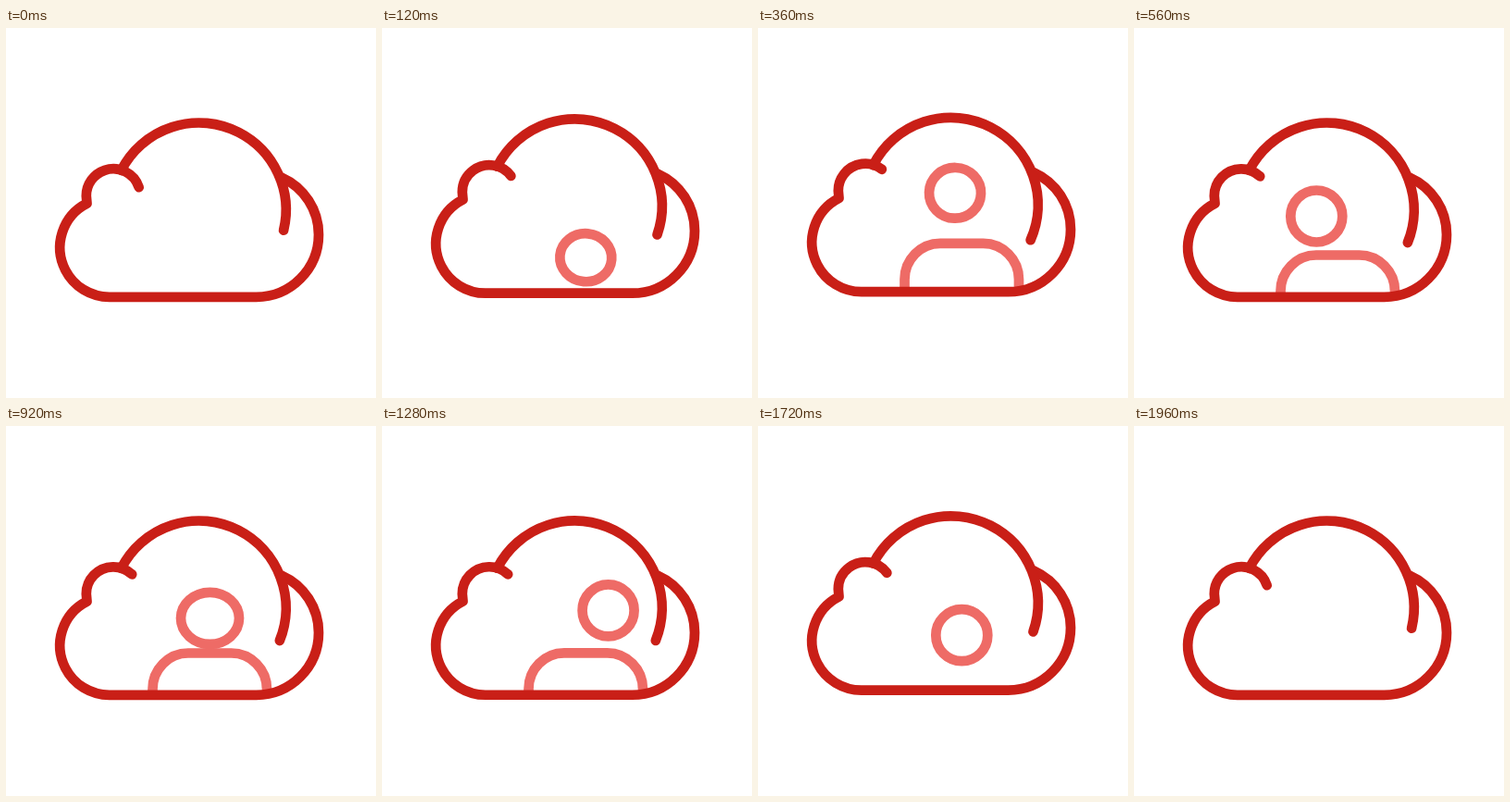
Write an HTML page with a canvas that moves like this. It is 400x400 px and loops after 2 s.

```html
<!DOCTYPE html>
<html lang="en">
<head>
<meta charset="utf-8">
<title>Cloud user</title>
<style>
  html, body { margin: 0; width: 100%; height: 100%; overflow: hidden; background: #fff; }
  canvas { display: block; width: 100vw; height: 100vh; }
</style>
</head>
<body>
<canvas id="stage"></canvas>
<script>
const LOOP = 2000, STEP = 40, SIZE = 400, BASE = 290.8;
const RED = '#c91f17', PINK = '#ee6b66';
const canvas = document.getElementById('stage');
const ctx = canvas.getContext('2d');
const rad = deg => deg * Math.PI / 180;
const mix = (a, b, p) => a + (b - a) * p;

// Smooth progress from 0 to 1 between two times
function ramp(t, from, to) {
  const p = Math.min(1, Math.max(0, (t - from) / (to - from)));
  return p * p * (3 - 2 * p);
}

function pose(t) {
  const rise = ramp(t, 0, 240), settle = ramp(t, 240, 560);
  const roll = ramp(t, 755, 1090);
  const leave = ramp(t, 1260, 1630), sink = ramp(t, 1630, 1850);
  const shown = rise - sink;    // 0 below the base, 1 above it
  const seat = settle - leave;  // 1 while the head rests on the shoulders
  const press = Math.sin(Math.PI * roll);
  const body = mix(390, 227, shown) + 18.5 * seat;
  return {
    body,
    lift: -8.2 * (shown - seat),
    slide: 18.5 * (rise - ramp(t, 1480, 1960)) - 4.5 * seat,
    x: 220.3 + seat * mix(-23, 24.5, roll),
    y: body - 60.3 + seat * mix(18.3, 14.5, roll) + 6.2 * press,
    wide: 3.5 * press,
    flat: rise * (1 - ramp(t, 240, 400))
  };
}

function stroke(color, draw) {
  ctx.strokeStyle = color;
  ctx.beginPath();
  draw();
  ctx.stroke();
}

function person(s) {
  const floor = BASE + s.lift, low = s.body + 39;
  const foot = Math.max(floor, low) + 8;
  ctx.save();
  ctx.beginPath();
  ctx.rect(0, 0, SIZE, floor);
  ctx.clip();
  stroke(PINK, () => {
    ctx.moveTo(158.5, foot);
    ctx.ellipse(197, low, 38.5, 39, 0, Math.PI, Math.PI * 1.5);
    ctx.ellipse(243.5, low, 38.5, 39, 0, -Math.PI / 2, 0);
    ctx.lineTo(282, foot);
  });
  stroke(PINK, () => ctx.ellipse(s.x, s.y, 28 + s.wide, 28 - 4 * s.flat,
    rad(10) * s.flat, 0, Math.PI * 2));
  ctx.restore();
}

function cloud(s) {
  ctx.save();
  ctx.translate(0, s.lift);
  // Small bump, left lobe, base and right lobe
  stroke(RED, () => {
    ctx.arc(116, 181.5, 29.2, rad(-18.7) - s.slide / 29.2, -Math.PI, true);
    ctx.arc(111.8, BASE - 53.5, 53.5, rad(243), rad(90), true);
    ctx.arc(270.5, BASE - 67.5, 67.5, rad(90), rad(-66), true);
  });
  // Main dome
  stroke(RED, () => ctx.arc(208.5, 196.7, 94.2, rad(207.1), rad(373.5) + s.slide / 94.2));
  ctx.restore();
}

function fit() {
  const dpr = window.devicePixelRatio || 1;
  canvas.width = Math.round(innerWidth * dpr);
  canvas.height = Math.round(innerHeight * dpr);
}

const start = performance.now();

function frame() {
  const elapsed = Math.max(0, performance.now() - start) % LOOP;
  const s = pose(Math.floor(elapsed / STEP) * STEP);
  ctx.setTransform(canvas.width / SIZE, 0, 0, canvas.height / SIZE, 0, 0);
  ctx.fillStyle = '#fff';
  ctx.fillRect(0, 0, SIZE, SIZE);
  ctx.lineWidth = 10.7;
  ctx.lineCap = ctx.lineJoin = 'round';
  person(s);
  cloud(s);
  requestAnimationFrame(frame);
}

addEventListener('resize', fit);
fit();
frame();
</script>
</body>
</html>
```
